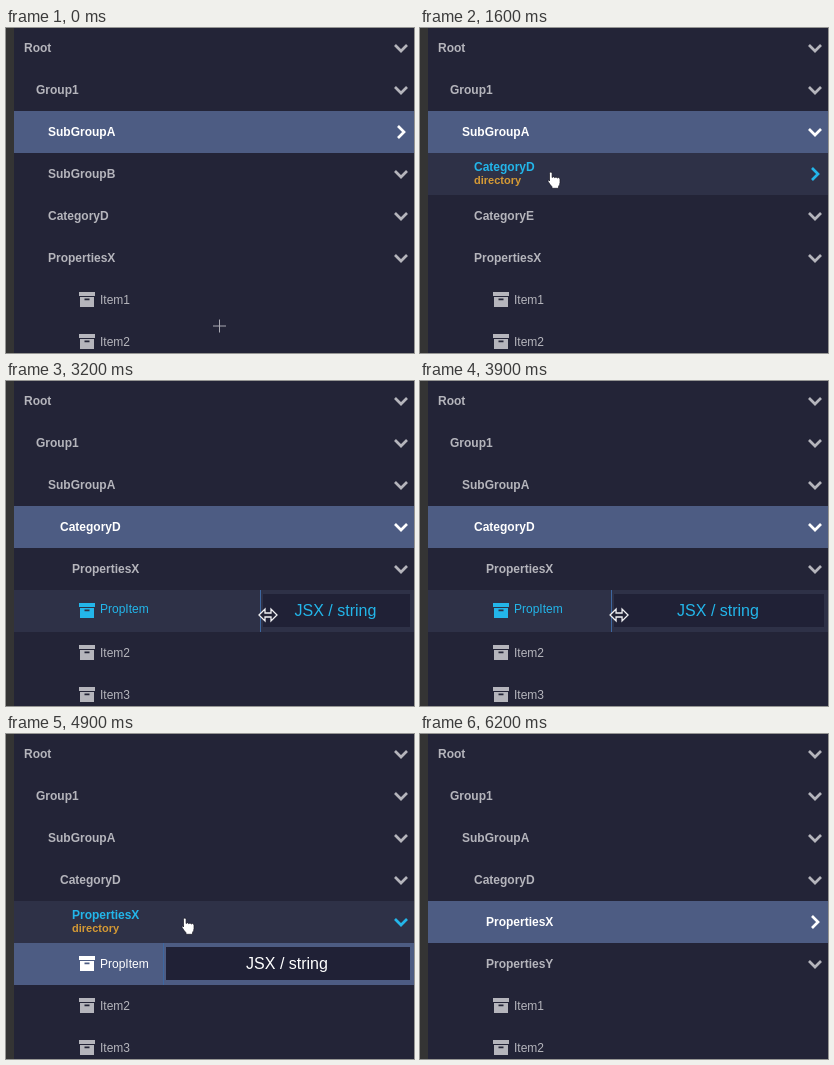
An HTML page for the animation above (6.3 s loop, 408 by 325 pixels).

```html
<!DOCTYPE html>
<html lang="en">
<head>
<meta charset="utf-8">
<title>Tree menu</title>
<style>
html, body { margin: 0; width: 100%; height: 100%; overflow: hidden; background: #343434; }
#stage { position: relative; width: 408px; height: 325px; overflow: hidden; background: #343434;
  font: bold 12px/42px "Liberation Sans", Arial, sans-serif; white-space: pre; }
#tree { position: absolute; left: 8px; top: -1px; width: 400px; height: 326px; overflow: hidden; background: #232437; }
.row { position: relative; height: 42px; }
.row > * { position: absolute; top: 0; left: 0; }
.sub { font-size: 11px; color: #d59a35; }
.item { font-weight: normal; }
.kids { overflow: hidden; }
.cell { right: 0; height: 42px; border-left: 1px solid; box-sizing: border-box; font-size: 16px; }
.cell i { position: absolute; left: 2px; right: 4px; top: 4px; bottom: 5px; background: #202136; }
.cell b { position: absolute; left: 0; right: 4px; text-align: center; font-weight: normal; }
#pointer { position: absolute; left: 0; top: 0; }
</style>
</head>
<body>
<div id="stage">
  <div id="tree"></div>
  <svg id="pointer" width="408" height="325">
    <path id="cross" d="M-6 0H7M.5-6.500V6.500" stroke="#a9a9b2" fill="none"/>
    <path id="hand" fill="#fff" stroke="#1b1b28" stroke-width=".7" d="M-4.500-6.500q0-1.500 1.300-1.500t1.300 1.500v4l1.500-.8 1 1 1.600-.8 1 1.200 1.400-.6q1.400.5 1.400 2v3q0 2-1.500 4v1.800h-6.500v-1.500q-2-2-4-5.500-.3-1.700 1.500-1v.7z"/>
    <path id="resize" fill="#232437" stroke="#f0f0f3" stroke-width="1.300" d="M-9 0L-3-6V-2H3V-6L9 0L3 6V2H-3V6Z"/>
  </svg>
</div>
<script>
const LOOP = 6300, ROW = 42;
const GREY = [181, 181, 188], WHITE = [255, 255, 255], CYAN = [35, 182, 234];
const BASE = [35, 36, 55], HOVER = [46, 49, 71], FOCUS = [77, 92, 131];
const LINE = [43, 66, 99], LINE_ON = [62, 103, 160];

const $ = id => document.getElementById(id);
const ramp = (t, a, b) => Math.min(1, Math.max(0, (t - a) / (b - a)));
const ease = k => k * k * (3 - 2 * k);
const mix = (a, b, k) => a.map((v, i) => v + (b[i] - v) * k);
const rgb = c => `rgb(${c.map(Math.round)})`;

const group = (name, opts = {}, kids = []) => ({ name, kids, ...opts });
const item = (name, opts = {}) => ({ name, leaf: true, kids: [], ...opts });

// hover and focus are [start, end] times; toggle is [start, end, from, to]
const model = [group('Root', {}, [group('Group1', {}, [
  group('SubGroupA', { focus: [-2000, 1800], toggle: [780, 1000, 0, 1] }, [
    group('CategoryD', { hover: [1300, 2000], focus: [1800, 4200], toggle: [1800, 2150, 0, 1] }, [
      group('PropertiesX', { hover: [2160, 2300], again: [4330, 5100], focus: [4900, 9999], toggle: [4900, 5250, 1, 0] }, [
        item('PropItem', { hover: [2420, 4950], focus: [3800, 4900], cell: 'JSX / string' }),
        item('Item2'), item('Item3')
      ]),
      group('PropertiesY', { hover: [5270, 5390] }),
      item('Item1', { hover: [5430, 5660] }),
      item('Item2', { hover: [5680, 5790] })
    ]),
    group('CategoryE'), group('PropertiesX'), item('Item1'), item('Item2')
  ]),
  group('SubGroupB', { hover: [430, 520] }),
  group('CategoryD', { hover: [350, 430] }),
  group('PropertiesX', { hover: [260, 350] }),
  item('Item1', { hover: [130, 260] }), item('Item2')
])])];

// time, x, y of the pointer's middle
const path = [
  [0, 213, 298], [80, 213, 298], [700, 150, 109], [1080, 150, 109], [1580, 134, 152],
  [1980, 134, 152], [2400, 222, 230], [2550, 222, 230], [3080, 262, 234], [3200, 262, 234],
  [3600, 254, 234], [4120, 165, 234], [4200, 165, 234], [4400, 177, 183], [4650, 182, 192],
  [5050, 182, 192], [5500, 185, 275], [5600, 185, 277], [5950, 192, 350], [LOOP, 192, 350]
];

const rows = [];

function add(parent, tag, cls, text = '') {
  const el = document.createElement(tag);
  el.className = cls;
  el.textContent = text;
  parent.append(el);
  return el;
}

function build(list, parent, depth) {
  for (const n of list) {
    const left = (n.leaf ? 86 : 10 + 12 * depth) + 'px';
    n.row = add(parent, 'div', n.leaf ? 'row item' : 'row');
    n.art = add(n.row, 'div', '');
    n.art.innerHTML = '<svg width="400" height="42" style="display:block">' + (n.leaf
      ? '<path fill="currentColor" fill-rule="evenodd" d="M65 13h16v4h-16zM66 18h14v10h-14zM70.500 19.500h5v1.700h-5z"/>'
      : '<path fill="none" stroke="currentColor" stroke-width="2.700" d="M-6-3L0 3L6-3"/>') + '</svg>';
    n.mark = n.art.querySelector('path');
    n.title = add(n.row, 'span', '', n.name);
    n.title.style.left = left;
    if (!n.leaf) {
      n.sub = add(n.row, 'span', 'sub', 'directory');
      n.sub.style.left = left;
    }
    if (n.cell) {
      n.panel = add(n.row, 'div', 'cell');
      add(n.panel, 'i', '');
      add(n.panel, 'b', '', n.cell);
    }
    rows.push(n);
    if (n.kids.length) {
      n.box = add(parent, 'div', 'kids');
      build(n.kids, n.box, depth + 1);
    }
  }
}

function pulse(t, span, lag, time) {
  return span ? ramp(t, span[0] + lag, span[0] + lag + time) * (1 - ramp(t, span[1], span[1] + 200)) : 0;
}

function openness(n, t) {
  if (!n.toggle) return 1;
  const [a, b, from, to] = n.toggle;
  return from + (to - from) * ease(ramp(t, a, b));
}

function height(n, t) {
  return n.kids.reduce((sum, k) => sum + ROW + height(k, t), 0) * openness(n, t);
}

function pointerAt(t) {
  let i = 0;
  while (i < path.length - 2 && path[i + 1][0] <= t) i++;
  const [a, b] = [path[i], path[i + 1]];
  return mix(a, b, ease(ramp(t, a[0], b[0]))).slice(1);
}

function drawRow(n, t) {
  const [on, off] = n.focus || [1e5, 2e5];
  const hover = Math.max(pulse(t, n.hover, n.leaf ? 70 : 0, 230), pulse(t, n.again, 0, 250));
  const fill = ramp(t, on + 450, on + 1000) * (1 - ramp(t, off, off + 500));
  const fade = 1 - ramp(t, off + 250, off + 550);
  const bright = (n.leaf ? ramp(t, on + 450, on + 800) : ramp(t, on + 600, on + 950)) * fade;
  const lift = n.leaf ? 0 : ramp(t, on, on + 250) * (1 - ramp(t, on + 620, on + 1000));
  const glow = Math.max(hover, lift);
  const ink = rgb(mix(mix(GREY, CYAN, glow), WHITE, bright));

  n.row.style.background = rgb(mix(mix(BASE, HOVER, glow), FOCUS, fill));
  n.title.style.color = ink;
  const rise = n.leaf ? 2 * hover * (1 - bright) : 7 * hover * (1 - lift) + 12 * lift;
  n.title.style.transform = `translateY(${-rise}px)`;

  if (n.leaf) {
    n.art.style.color = rgb(mix(mix(GREY, CYAN, pulse(t, n.hover, 0, 50)), WHITE, bright));
  } else {
    n.art.style.color = rgb(mix(mix(GREY, CYAN, hover), WHITE, ramp(t, on, on + 200) * fade));
    n.mark.setAttribute('transform', `translate(387 21) rotate(${-90 * (1 - openness(n, t))})`);
    n.sub.style.opacity = ramp(hover, .5, 1) * (1 - lift);
    n.sub.style.transform = `translateY(${2 + 4 * hover}px)`;
  }
  if (n.panel) {
    const edge = Math.min(254, Math.max(157, pointerAt(Math.min(t, 4150))[0] - 8));
    n.panel.style.left = (t < 3200 ? 246 : edge - 8) + 'px';
    n.panel.style.color = ink;
    n.panel.style.borderColor = rgb(mix(LINE, LINE_ON, hover));
    n.panel.firstChild.style.opacity = hover;
  }
  if (n.box) n.box.style.height = height(n, t) + 'px';
}

function drawPointer(t) {
  const [x, y] = pointerAt(t);
  const kind = t < 100 ? 'cross' : t >= 2950 && t < 4230 ? 'resize' : 'hand';
  for (const id of ['cross', 'hand', 'resize']) {
    $(id).style.display = id === kind ? '' : 'none';
    $(id).setAttribute('transform', `translate(${x} ${y})`);
  }
}

function frame() {
  const t = performance.now() % LOOP;
  rows.forEach(n => drawRow(n, t));
  drawPointer(t);
  requestAnimationFrame(frame);
}

build(model, $('tree'), 0);
frame();
</script>
</body>
</html>
```
